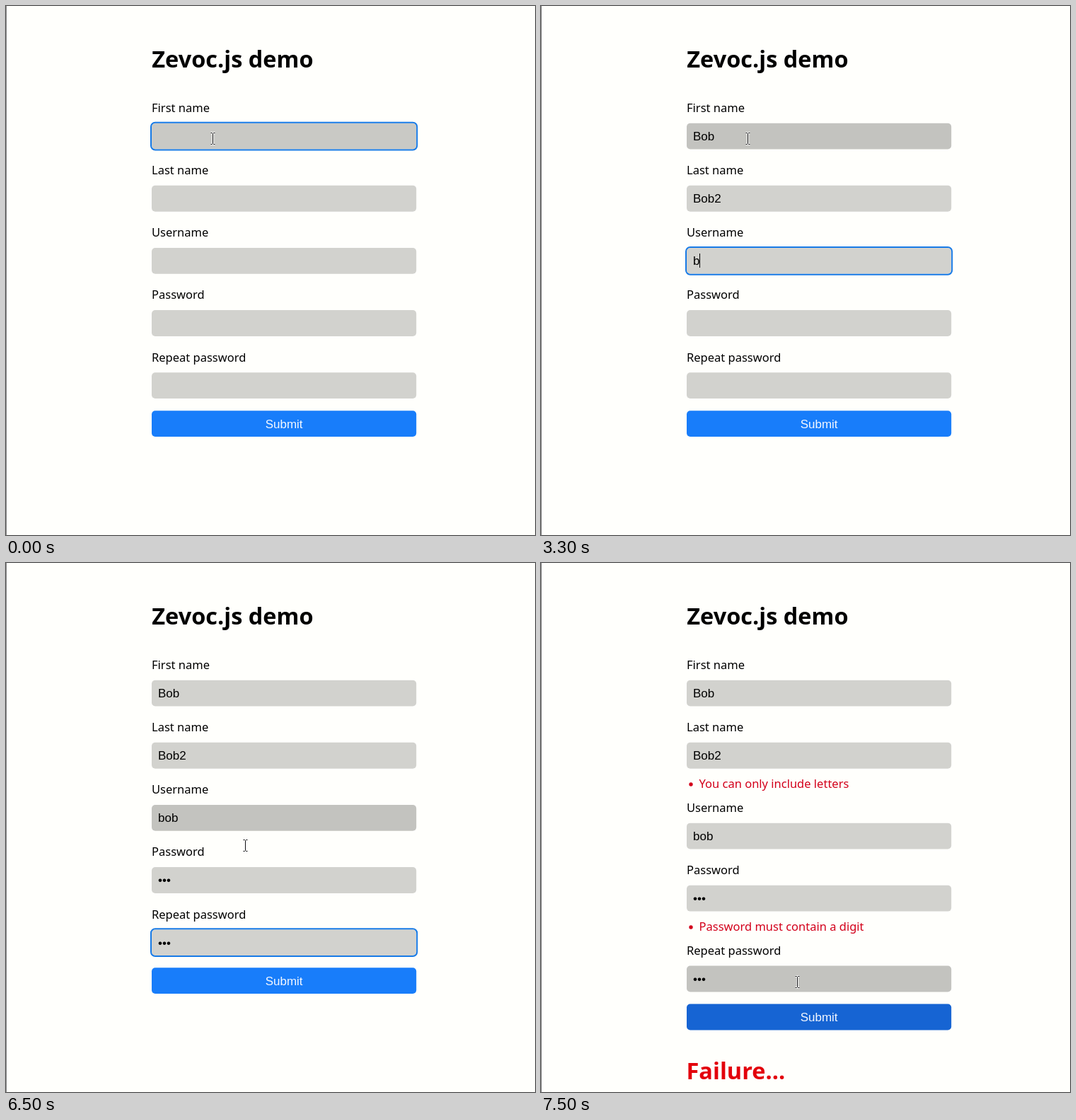
Write an HTML page with a canvas that moves like this. It is 748x748 px and loops after 8 s.

```html
<!DOCTYPE html>
<html lang="en">
<head>
<meta charset="utf-8">
<title>Form demo</title>
<style>
  html, body { margin: 0; width: 100%; height: 100%; overflow: hidden; background: #fffffc; }
  canvas { display: block; }
</style>
</head>
<body>
<canvas id="stage" width="748" height="748"></canvas>
<script>
const ctx = document.getElementById('stage').getContext('2d');
const LOOP = 8000, LEFT = 206, WIDTH = 374.2, HEIGHT = 36.8, PITCH = 88.13, TEXT_X = 215;
const SANS = '"Noto Sans", "Open Sans", sans-serif';
const LABEL = '16.5px ' + SANS, HEADING = 'bold 32.5px ' + SANS;
const INPUT = '17px "Liberation Sans", Arial, sans-serif';
const BUTTON = 5;
const labels = ['First name', 'Last name', 'Username', 'Password', 'Repeat password'];

// time, field, content
const typing = [
  [300, 0, ''], [600, 0, 'B'], [900, 0, 'Bo'], [1000, 0, 'Bob'],
  [1300, 1, ''], [2000, 1, 'B'], [2100, 1, 'Bob'], [2500, 1, 'Bob2'],
  [2800, 2, ''], [3300, 2, 'b'], [3400, 2, 'bo'], [3600, 2, 'bob'],
  [3800, 3, ''], [4200, 3, '•'], [4300, 3, '••'], [4500, 3, '•••'],
  [4900, 4, ''], [5300, 4, '•'], [5400, 4, '••'], [5700, 4, '•••']
];
// time, focused field, ring opacity
const focus = [
  [0, 0, 1], [1400, 1, .5], [1500, 1, 1], [2800, 2, .7], [3000, 2, 1],
  [3800, 3, .5], [3900, 3, 1], [4900, 4, .5], [5000, 4, 1], [7200, BUTTON, 1]
];
// time, x, y, hovered control
const mouse = [
  [0, 292.5, 187.5, 0], [6200, 302.5, 222.5, 0], [6300, 333.5, 318.5, -1], [6500, 338.5, 399.5, 2],
  [6600, 345.5, 455.5, 3], [6700, 352.5, 535.5, 4], [6800, 357, 600, BUTTON], [6900, 361, 618, BUTTON],
  [7000, 362, 608, BUTTON], [7100, 362, 598, BUTTON], [7200, 362, 591, BUTTON], [7500, 362.5, 592.5, 4]
];
const press = [[0, 1], [7200, .95], [7300, .907], [7400, .95], [7500, 1]];

const at = (keys, t) => keys.filter(k => k[0] <= t).pop();

function text(str, x, y, font, color = '#000', align = 'left') {
  ctx.font = font;
  ctx.fillStyle = color;
  ctx.textAlign = align;
  ctx.fillText(str, x, y);
}

function box(x, y, w, h, r) {
  ctx.beginPath();
  ctx.roundRect(x, y, w, h, r);
}

function error(str, y) {
  ctx.fillStyle = '#d3001b';
  ctx.beginPath();
  ctx.arc(212, y - 5, 2.7, 0, 7);
  ctx.fill();
  text(str, 223.5, y, LABEL, '#d3001b');
}

function field(i, top, value, hover, ring, t) {
  text(labels[i], 206, top - 15.7, LABEL);
  ctx.fillStyle = hover ? (t < 300 ? '#c9c9c5' : '#c3c3bf') : '#d2d2ce';
  box(LEFT, top, WIDTH, HEIGHT, 5);
  ctx.fill();
  if (ring) {
    ctx.globalAlpha = ring;
    ctx.strokeStyle = '#177ae6';
    ctx.lineWidth = 2;
    box(LEFT - 1, top - 1, WIDTH + 2, HEIGHT + 2, 6);
    ctx.stroke();
    ctx.globalAlpha = 1;
  }
  text(value, TEXT_X, top + 24.3, INPUT);
}

function caret(top, value) {
  ctx.font = INPUT;
  const x = Math.round(TEXT_X + ctx.measureText(value).width);
  ctx.fillStyle = '#000';
  ctx.fillRect(x, Math.round(top + 8.2), 1, 20);
}

function button(top, dark, scale) {
  ctx.save();
  ctx.translate(LEFT + WIDTH / 2, top + HEIGHT / 2);
  ctx.scale(scale, scale);
  ctx.fillStyle = dark ? '#1664d3' : '#187dfa';
  box(-WIDTH / 2, -HEIGHT / 2, WIDTH, HEIGHT, 5);
  ctx.fill();
  text('Submit', 0, 6, INPUT, '#f4f8ff', 'center');
  ctx.restore();
}

function pointer(x, y, arrow) {
  ctx.save();
  ctx.translate(x, y);
  ctx.lineJoin = 'round';
  const shape = new Path2D(arrow
    ? 'M.5 .5V16.5L4.3 13.2L6.8 18.8L9 17.8L6.6 12.3H11.8Z'
    : 'M-3 -8H-1L0 -7L1 -8H3M0 -7V7M-3 8H-1L0 7L1 8H3');
  ctx.strokeStyle = '#fff';
  ctx.lineWidth = 2.6;
  ctx.stroke(shape);
  if (arrow) {
    ctx.fillStyle = '#1c1c1c';
    ctx.fill(shape);
  } else {
    ctx.strokeStyle = '#111';
    ctx.lineWidth = 1;
    ctx.stroke(shape);
  }
  ctx.restore();
}

function draw(t) {
  const values = ['', '', '', '', ''];
  for (const [time, i, value] of typing) if (time <= t) values[i] = value;
  const [, active, ring] = at(focus, t);
  const [, mx, my, hover] = at(mouse, t);
  const failed = t >= 7400;
  const top = i => 165.7 + i * PITCH + (failed ? (i > 1) * 25.7 + (i > 3) * 25.7 : 0);

  ctx.fillStyle = '#fffffc';
  ctx.fillRect(0, 0, 748, 748);
  ctx.fillStyle = '#858585';
  ctx.fillRect(0, 0, 1, 748);
  text('Zevoc.js demo', 206.3, 87, HEADING);

  labels.forEach((_, i) => {
    const glow = i === active ? ring : i === active - 1 ? 1 - ring : 0;
    field(i, top(i), values[i], i === hover, glow, t);
  });
  if (t >= 300 && t < 6200) {
    const i = at(typing, t)[1];
    caret(top(i), values[i]);
  }
  button(top(4) + 54, t >= 6800, at(press, t)[1]);
  if (failed) {
    error('You can only include letters', 318);
    error('Password must contain a digit', 520);
    text('Failure...', 205.5, 730, HEADING, '#e3000b');
  }
  pointer(mx, my, hover === BUTTON);
}

function tick() {
  draw(Math.floor(performance.now() % LOOP / 100) * 100);
  requestAnimationFrame(tick);
}
tick();
</script>
</body>
</html>
```
